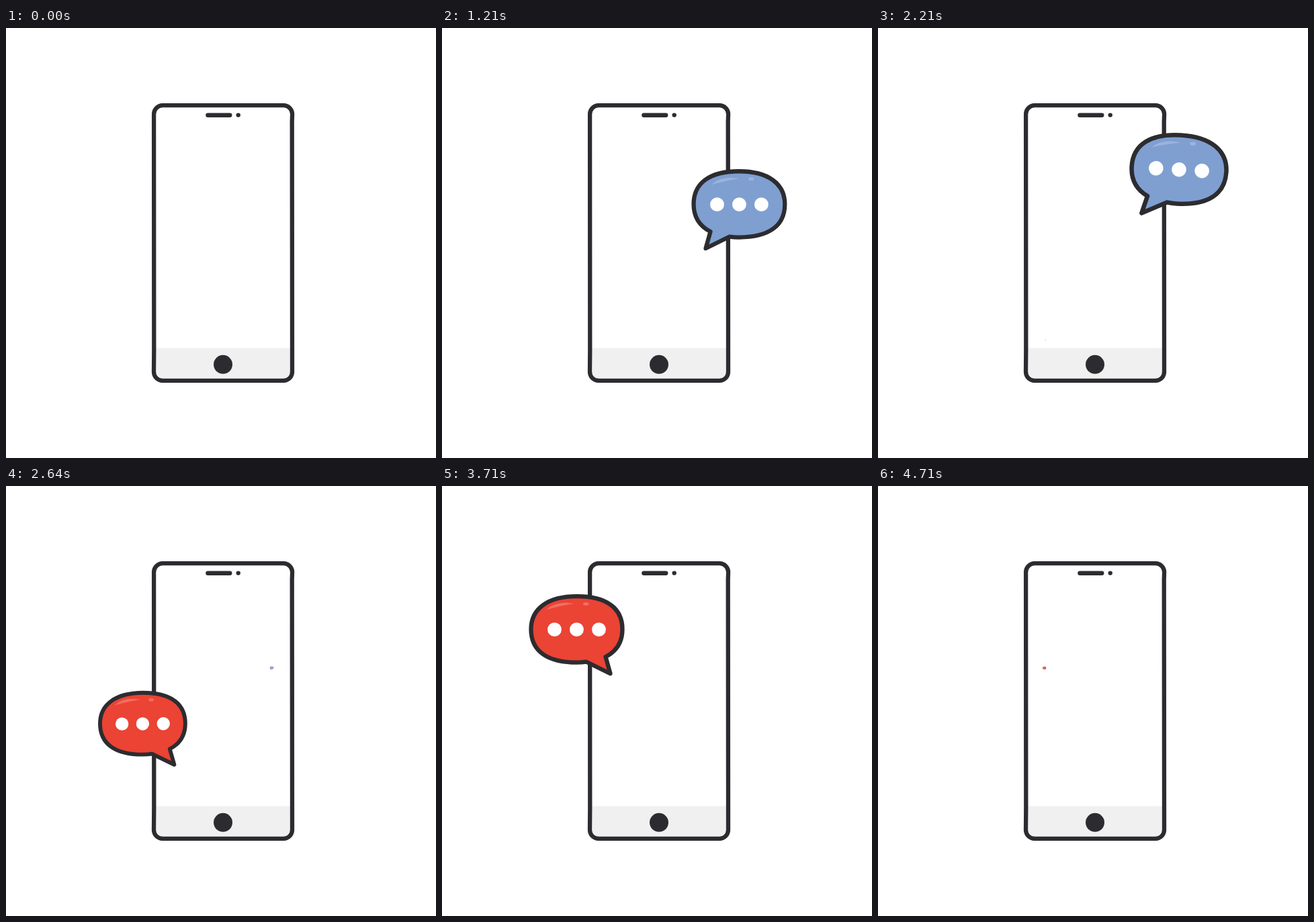
An HTML page for the animation above (4780 ms loop, 640 px wide and 640 px high).

```html
<!DOCTYPE html>
<html lang="en">
<head>
<meta charset="utf-8">
<title>Phone chat</title>
<style>
  html, body { margin: 0; width: 100%; height: 100%; overflow: hidden; background: #fff; }
  svg { display: block; width: 100%; height: 100%; }
</style>
</head>
<body>
<svg viewBox="0 0 640 640">
  <defs>
    <path id="body" d="M392.5 327 L399.5 302 C384 294 374.5 281 374.5 261 C374.5 229 399 212 442 212
      C485 212 510.5 230 510.5 261 C510.5 293 487 310.5 442 310.5 Q435 310.5 428 309.5 Z"
      stroke="#2c2c30" stroke-width="6.3" stroke-linejoin="round"/>
    <g id="dots" fill="#fff">
      <circle cx="409.5" cy="261.5" r="10.4"/>
      <circle cx="442.5" cy="261.5" r="10.4"/>
      <circle cx="475.5" cy="261.5" r="10.4"/>
    </g>
    <g id="shine">
      <path d="M401 232 Q417 217.5 443 223 Q423 225.5 401 232 Z"/>
      <ellipse cx="460.3" cy="223.3" rx="4.2" ry="2.6"/>
    </g>
  </defs>

  <g id="phone">
    <rect x="221" y="476.5" width="204" height="47" fill="#f0f0f0"/>
    <path d="M425.7 139 L426 512 A13 13 0 0 1 413 524.9 H233 A13 13 0 0 1 220 512 L220.3 478 L220.1 128
      A13 13 0 0 1 233 115.2 H413 A13 13 0 0 1 426.1 128 Z"
      fill="none" stroke="#2c2c30" stroke-width="6.3" stroke-linejoin="round"/>
    <g fill="#2c2c30">
      <rect x="297.2" y="126.5" width="39.2" height="6.4" rx="3.2"/>
      <circle cx="345.7" cy="129.6" r="3.2"/>
      <circle cx="323" cy="500.8" r="14"/>
    </g>
  </g>

  <g id="blue">
    <g transform="translate(-393.5 -324.5)">
      <use href="#body" fill="#7f9fd1"/>
      <use href="#shine" fill="#9ab4de"/>
      <use href="#dots"/>
    </g>
  </g>
  <g id="red">
    <g transform="translate(-249.5 -324.5)">
      <g transform="translate(643 0) scale(-1 1)">
        <use href="#body" fill="#eb4334"/>
        <use href="#dots"/>
      </g>
      <use href="#shine" x="-246" fill="#f06e62"/>
    </g>
  </g>
</svg>

<script>
  const LOOP = 4780, STEP = 1000 / 14;
  const GROWN = 3.2, CALM = 15, LEAVE = 28, GONE = 35.5; // ages in steps

  const bubbles = [
    { el: document.getElementById('blue'), x: 393.5, birth: 2, side: 1 },
    { el: document.getElementById('red'), x: 249.5, birth: 30.9, side: -1 }
  ];

  const clamp = u => Math.max(0, Math.min(1, u));
  const glide = (age, from, to, distance) => distance * clamp((age - from) / (to - from));

  // Climbs a little faster in the middle.
  const height = age => 466 - glide(age, 0, 11.1, 97.5) - glide(age, 11.1, 16, 54) - glide(age, 16, 21.6, 41.5);

  // Pops up, overshoots and settles; swells briefly before it shrinks away.
  function size(age) {
    if (age <= 0 || age > GONE) return 0;
    if (age < GROWN) return (age / GROWN) ** 1.4;
    if (age < LEAVE) {
      const d = age - GROWN;
      return 1 + .23 * Math.exp(-.4 * d) * Math.sin(Math.PI * d / 2.1);
    }
    const swell = Math.min(age - LEAVE, 2), shrink = age - LEAVE - swell;
    return (1 + .037 * swell) / (1 + 1.1 * shrink ** 2);
  }

  // Wags while climbing, and twice as fast on leaving.
  function tilt(age) {
    if (age < CALM) return 3.4 * Math.sin(Math.PI * age / 3);
    if (age < LEAVE) return 0;
    return 3.8 * Math.sin(2 * Math.PI * (age - LEAVE) / 3);
  }

  function draw(time) {
    const step = Math.floor((time % LOOP) / STEP + .1);
    for (const { el, x, birth, side } of bubbles) {
      const age = step - birth, s = size(age);
      el.setAttribute('visibility', s > 0 ? 'visible' : 'hidden');
      el.setAttribute('transform',
        `translate(${x} ${height(age)}) rotate(${side * tilt(age)}) scale(${s})`);
    }
  }

  const start = performance.now();
  function tick() {
    draw(performance.now() - start);
    requestAnimationFrame(tick);
  }
  tick();
</script>
</body>
</html>
```
